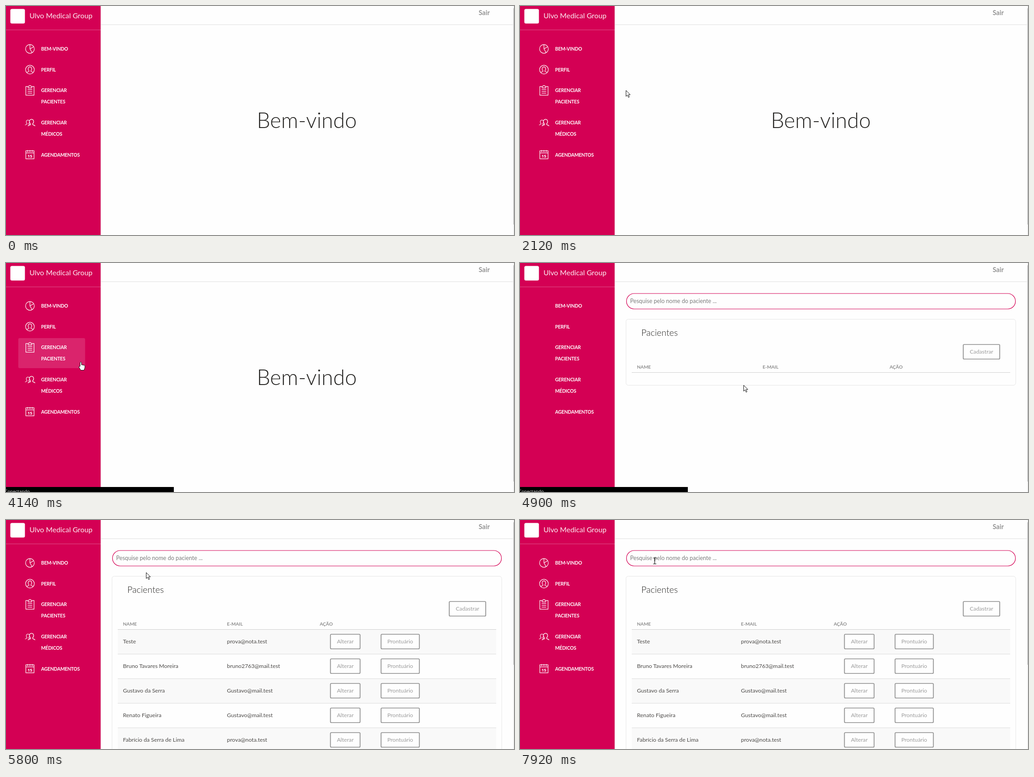
These frames come from a looping animation (1114x503 px, 8 s). An HTML page:

```html
<!DOCTYPE html>
<html lang="pt">
<head>
<meta charset="utf-8">
<title>Painel</title>
<style>
  html, body { margin: 0; width: 100%; height: 100%; overflow: hidden; background: #fefefe; }
  svg { display: block; width: 100vw; height: 100vh; }
  text { font-family: Lato, "Open Sans", sans-serif; white-space: pre; }
  .menu { font-size: 10.4px; font-weight: 700; fill: #fff; letter-spacing: -.02em; }
  .head { font-size: 10.2px; font-weight: 700; fill: #8d8d8d; }
  .cell { font-size: 12.3px; fill: #4c4a48; }
  .title { font-weight: 300; fill: #252422; }
  .hover { fill: #fff; }
  .btn rect { fill: #fefefe; stroke: #8c8c8c; stroke-width: 1.7; }
  .btn text { font-size: 12.2px; fill: #9b9b9b; text-anchor: middle; }
  .btn.over rect { fill: #66615b; stroke: #66615b; }
  .btn.over text { fill: #fff; }
  .icon { fill: none; stroke: #fff; stroke-width: 1.2; }
  .icon text { font: bold 9px "Open Sans", sans-serif; text-anchor: middle; fill: #fff; stroke: none; }
  #pointer path { fill: #fff; stroke: #111; stroke-linejoin: round; }
  #pointer #beam { fill: none; stroke-width: 1.2; }
</style>
</head>
<body>
<svg viewBox="0 0 1114 503" preserveAspectRatio="none">
  <rect width="1114" height="503" fill="#fefefe"/>
  <path d="M208 41H1112" stroke="#dedede"/>
  <text x="1036.5" y="20" font-size="14.5" font-weight="700" fill="#949494">Sair</text>
  <text id="welcome" class="title" x="550" y="268" font-size="46.6">Bem-vindo</text>

  <g id="patients">
    <rect x="233.5" y="67" width="853" height="34" rx="17" fill="none" stroke="#d40054" stroke-width="1.2"/>
    <text x="241.5" y="88" font-size="12.6" fill="#7c7c7c">Pesquise pelo nome do paciente ...</text>
    <path id="caret" d="M242.5 77V91" stroke="#333"/>
    <rect id="card" x="232.5" y="123.5" width="854.5" rx="5" fill="none" stroke="#e6e6e6"/>
    <text class="title" x="266" y="160" font-size="19.6">Pacientes</text>
    <g id="heads"></g>
    <g id="rows"></g>
    <path d="M245 240.5H1075" stroke="#cfcfcf"/>
  </g>

  <rect x="1112" width="2" height="503" fill="#f1f1f1"/>
  <rect id="thumb" x="1113" y="5" width="1" fill="#a8a8a8"/>

  <rect width="208" height="503" fill="#d40054"/>
  <path d="M207.5 0V503" stroke="#ddd" stroke-opacity=".5"/>
  <path d="M0 52.5H208" stroke="#fff" stroke-opacity=".3"/>
  <rect x="9.5" y="6.5" width="32" height="32" rx="3.5" fill="#fff"/>
  <text x="51.5" y="27" font-size="15.8" fill="#fff" fill-opacity=".92">Ulvo Medical Group</text>
  <g id="menu"></g>

  <g id="status">
    <rect y="492" width="368" height="11"/>
    <text x="-3" y="505" font-size="9.8" fill="#e8e8e8" style="font-family:'Open Sans',sans-serif">Conectando...</text>
  </g>

  <g id="pointer">
    <path id="arrow" d="M.5 .5V13.5L3.5 10.7L5.8 15.8L7.9 14.8L5.6 9.900H9.8Z"/>
    <path id="hand" d="M-1.5 10V1.5Q0 -.5 1.5 1.5V6.5L8 7.5Q9 8 9 10V13L7 18.5H0L-4 12Q-4.5 9.5 -1.5 10Z"/>
    <path id="beam" d="M-3.5 -6.5H3.5M0 -6.5V6.5M-3.5 6.5H3.5"/>
  </g>
</svg>
<script>
const LOOP = 8000, START = 80, LOAD = 4570, ICONS = 5150, ROWS = 5800, FADE = 150;
const $ = id => document.getElementById(id);
const all = selector => [...document.querySelectorAll(selector)];
const show = (node, on) => { node.style.display = on ? '' : 'none'; };
const label = (cls, x, y, s) => `<text class="${cls}" x="${x}" y="${y}">${s}</text>`;
const rect = (b, rest) => `<rect x="${b.x}" y="${b.y}" width="${b.w}" height="${b.h}" ${rest}/>`;
const inside = (b, p) => p.x > b.x && p.x < b.x + b.w && p.y > b.y && p.y < b.y + b.h;

// Icons, each centred on the origin
const ring = '<circle r="9.6"/>';
const person = (x, scale) => `<path transform="translate(${x}) scale(${scale})"
  d="M-7 7C-6 4 -2 6 -2 3C-6 -1 -4 -6.500 0 -6.500S6 -1 2 3C2 6 6 4 7 7"/>`;
const spokes = [-90, -30, 60].map(a => `<path d="M0 0H9.6" transform="rotate(${a})"/>`).join('');
const lines = [-2, 2, 6].map(y => `<path d="M-5 ${y}H5"/>`).join('');
const pins = [-5, 0, 5].map(x => `<path d="M${x} -10V-6"/>`).join('');
const icons = [
  ring + spokes,
  ring + person(0, .95),
  '<path d="M-4 -8.500H-9V10.500H9V-8.500H4M-4 -5.500V-8.500L0 -11L4 -8.500V-5.500Z"/>' + lines,
  person(-4.5, .85) + person(3.5, 1.1),
  '<path d="M-9 -8.500H9V9H-9ZM-9 -4H9"/>' + pins + label('', 0, 6.5, '15')
];

// Menu
const LINE = 25;
const links = [];
let top_ = 73.7;
$('menu').innerHTML = ['BEM-VINDO', 'PERFIL', 'GERENCIAR PACIENTES', 'GERENCIAR MÉDICOS', 'AGENDAMENTOS']
  .map((name, i) => {
    const words = name.split(' '), y = top_;
    const box = { x: 27, y, w: 146.5, h: 41 + LINE * (words.length - 1) };
    links.push(box);
    top_ += box.h + 4.6;
    return rect(box, 'class="hover" rx="3"') +
      `<g class="icon" transform="translate(52.5 ${y + 20.5})">${icons[i]}</g>` +
      words.map((w, n) => label('menu', 77, y + 24.4 + n * LINE, w)).join('');
  }).join('');

// Table
const buttons = [];
function button(x, y, w, s) {
  const box = { x, y, w, h: 32 };
  buttons.push(box);
  return `<g class="btn">${rect(box, 'rx="2"')}${label('', x + w / 2, y + 20, s)}</g>`;
}
const people = [
  ['Teste', 'prova@nota.test'],
  ['Bruno Tavares Moreira', 'bruno2763@mail.test'],
  ['Gustavo da Serra', 'Gustavo@mail.test'],
  ['Renato Figueira', 'Gustavo@mail.test'],
  ['Fabrício da Serra de Lima', 'prova@nota.test']
];
$('heads').innerHTML = button(972, 179, 80, 'Cadastrar') +
  ['NAME', 'E-MAIL', 'AÇÃO'].map(s => label('head', 256.5, 231.5, s)).join('');
$('rows').innerHTML = people.map(([name, mail], i) => {
  const y = 240 + i * 54;
  return rect({ x: 245, y, w: 830, h: 54 }, `fill="${i % 2 ? '#fefefe' : '#f9f9f9'}"`) +
    `<path d="M245 ${y + .5}H1075" stroke="#dcdcdc"/>` +
    label('cell', 256.5, y + 31, name) + label('cell', 484.5, y + 31, mail) +
    button(711.5, y + 11, 65, 'Alterar') + button(822.5, y + 11, 84, 'Prontuário');
}).join('');

const heads = all('.head'), hoverNodes = all('.hover'), iconNodes = all('.icon'), buttonNodes = all('.btn');

// Pointer moves: start, end, x, y
const moves = [
  [START, 670, 746, 291], [1180, 1970, 254, 137], [2020, 2120, 232, 185], [2120, 2800, 154, 93],
  [2840, 3310, 121, 258], [3340, 3630, 160, 174], [3680, 4140, 164, 217], [LOAD, 4900, 490, 268],
  [4900, 5580, 307, 115], [ROWS, 6590, 860, 424], [6640, 7510, 295.5, 90]
];
const ease = u => u * u * (3 - 2 * u);

function pointerAt(t) {
  const p = { x: 1052, y: 496 };
  for (const [start, end, x, y] of moves) {
    if (t <= start) break;
    const u = ease(Math.min(1, (t - start) / (end - start)));
    p.x += (x - p.x) * u;
    p.y += (y - p.y) * u;
  }
  return p;
}

// Share of the last FADE ms that the pointer spent in a box, eased
function glow(box, t) {
  let hits = 0;
  for (let dt = 0; dt < FADE; dt += 5) hits += inside(box, pointerAt(t - dt));
  return (hits * 5 / FADE) ** 2;
}

function draw(t) {
  const loaded = t >= LOAD, filled = t >= ROWS;
  show($('welcome'), !loaded);
  show($('patients'), loaded);
  show($('rows'), filled);
  show($('status'), t >= 4060 && t < 5490);
  show($('caret'), t >= 7410 && t < 7920);
  iconNodes.forEach(node => show(node, !loaded || t >= ICONS));
  $('card').setAttribute('height', filled ? 420 : 145);
  $('thumb').setAttribute('height', filled ? 313 : 475);
  heads[1].setAttribute('x', filled ? 484.5 : 532);
  heads[2].setAttribute('x', filled ? 688 : 810.5);

  const p = pointerAt(t);
  // The first link is the current page and has no highlight
  hoverNodes.forEach((node, i) => { node.style.opacity = i && !loaded ? .14 * glow(links[i], t) : 0; });
  const hits = buttons.map(b => filled && inside(b, p));
  buttonNodes.forEach((node, i) => node.classList.toggle('over', hits[i]));

  const linked = links.some(b => inside(b, p)) || hits.includes(true);
  const typing = loaded && inside({ x: 233, y: 66, w: 854, h: 35 }, p);
  show($('pointer'), t >= START);
  show($('hand'), linked);
  show($('beam'), typing);
  show($('arrow'), !linked && !typing);
  $('pointer').setAttribute('transform', `translate(${p.x} ${p.y})`);
}

function tick() {
  draw(performance.now() % LOOP);
  requestAnimationFrame(tick);
}
tick();
</script>
</body>
</html>
```
